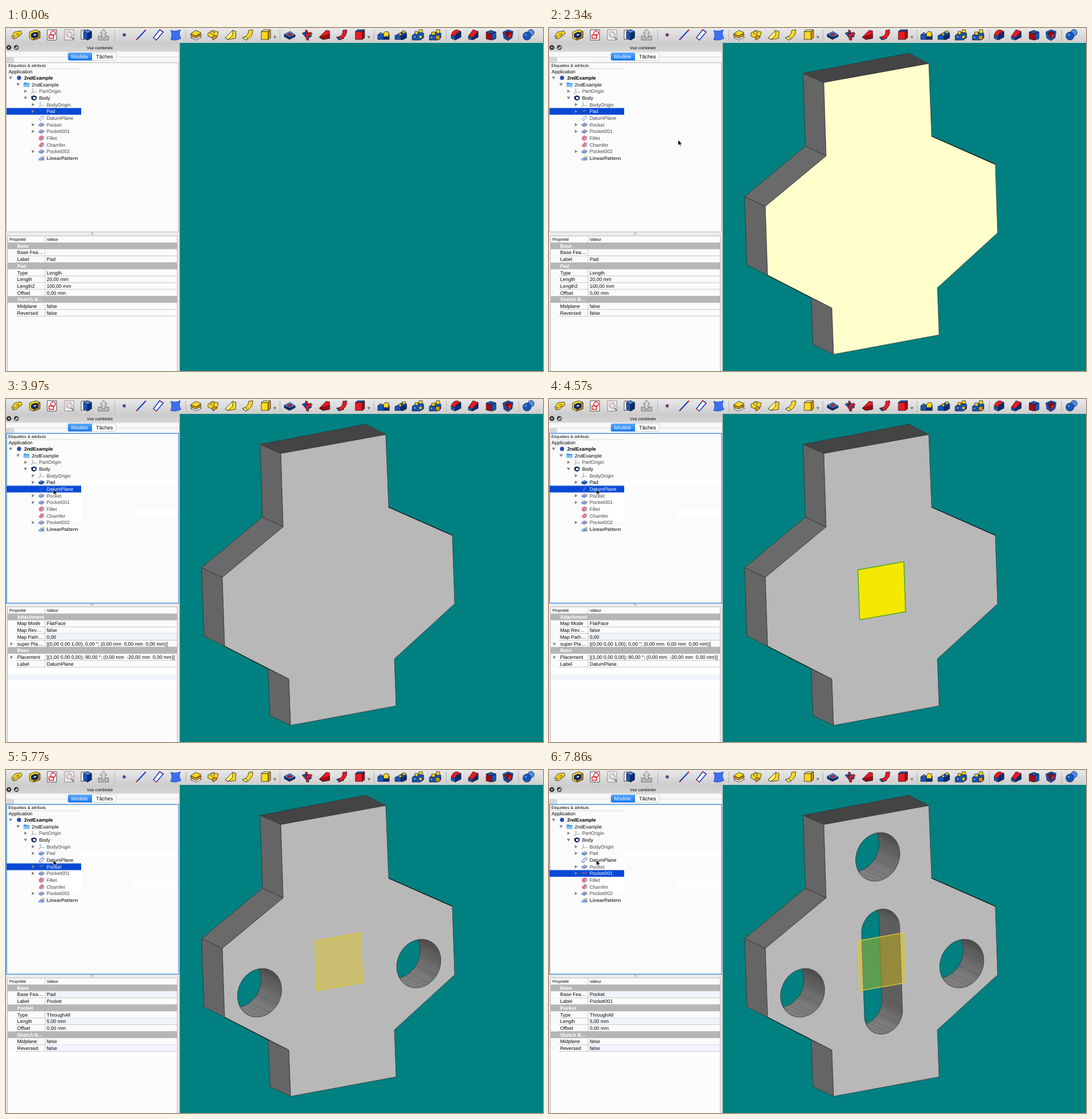
Recreate the animation shown at these times as an HTML page. Size 936 by 598 pixels, loop 8 s.

```html
<!DOCTYPE html>
<html lang="fr">
<head>
<meta charset="utf-8">
<title>Vue combinée</title>
<style>
html, body { margin: 0; width: 100%; height: 100%; overflow: hidden; background: #008080; }
svg { display: block; width: 936px; height: 598px; }
text { font: 8.5px "Liberation Sans", Arial, sans-serif; text-rendering: geometricPrecision; }
.small { font-size: 7.1px; }
.tab { font-size: 9px; }
.bold { font-weight: bold; }
#tools path, #tools circle, #tools rect { stroke: #1c1c28; stroke-width: .8; stroke-linejoin: round; }
#tools .n { fill: none; }
.y { fill: #ffd91c; } .o { fill: #d89a00; } .l { fill: #fff27a; }
.b { fill: #1257c0; } .d { fill: #082a78; } .c { fill: #4b8ff0; }
.r { fill: #ee1820; } .m { fill: #a80810; } .w { fill: #fff; }
#solid polygon, #solid path { stroke: #333; stroke-width: .8; stroke-linejoin: round; }
.row { --ink: #444; --o: .6; }
.row text { fill: var(--ink); }
.row use { opacity: var(--o); }
.live { --ink: #000; --o: 1; }
#bar, #cursor, #face, #plane, .row, .from { animation: 8s step-end infinite; }
#bar { animation-name: bar; }
#cursor { animation-name: cursor; }
#face { animation-name: face; }
#plane { animation-name: plane; }
#pad { animation-name: pad; }
#datum { animation-name: datum; }
#pocket { animation-name: pocket; }
#pocket1 { animation-name: pocket1; }
@keyframes solid { 0% { visibility: hidden } 16.875% { visibility: visible } }
@keyframes hover { 0% { visibility: hidden } 31.125% { visibility: visible } }
@keyframes trail { 0% { visibility: hidden } 36.75% { visibility: visible } }
@keyframes pickDatum { 0% { visibility: hidden } 49.625% { visibility: visible } }
@keyframes pickPocket { 0% { visibility: hidden } 64.625% { visibility: visible } }
@keyframes holes { 0% { visibility: hidden } 72.125% { visibility: visible } }
@keyframes pickPocket1 { 0% { visibility: hidden } 87% { visibility: visible } }
@keyframes slot { 0% { visibility: hidden } 96.375% { visibility: visible } }
@keyframes face { 0% { fill: #ffffcc } 31.125% { fill: #b8b8b8 } }
@keyframes plane {
  0% { visibility: hidden; fill: #f5e800; stroke: #48aa10 }
  53.375% { visibility: visible; fill: #f5e800; stroke: #48aa10 }
  64.625% { visibility: visible; fill: rgba(225,195,10,.42); stroke: #dcc838 }
}
@keyframes bar {
  0% { transform: translateY(0) }
  49.625% { transform: translateY(11.66px) }
  64.625% { transform: translateY(23.32px) }
  87% { transform: translateY(34.98px) }
}
@keyframes pad {
  0% { --ink: #fff; --o: .3 }
  19.875% { --ink: #fff; --o: .8 }
  49.625% { --ink: #000; --o: 1 }
  72.125% { --ink: #444; --o: .6 }
}
@keyframes datum {
  0% { --ink: #444; --o: .6 }
  49.625% { --ink: #fff; --o: .1 }
  57.125% { --ink: #fff; --o: .2 }
  64.625% { --ink: #000; --o: 1 }
}
@keyframes pocket {
  0% { --ink: #444; --o: .6 }
  64.625% { --ink: #fff; --o: .35 }
  72.125% { --ink: #fff; --o: .7 }
  87% { --ink: #000; --o: 1 }
  96.375% { --ink: #444; --o: .6 }
}
@keyframes pocket1 {
  0% { --ink: #444; --o: .6 }
  87% { --ink: #fff; --o: .35 }
  96.375% { --ink: #fff; --o: .7 }
}
@keyframes cursor {
  0% { transform: translate(-30px, -30px) }
  29.25% { transform: translate(225px, 195px) }
  31.125% { transform: translate(124.5px, 202.5px) }
  33% { transform: translate(121px, 200px) }
  34.875% { transform: translate(124.5px, 194px) }
  36.75% { transform: translate(82px, 165px) }
  38.5% { transform: translate(81px, 164px) }
  40.375% { transform: translate(82.5px, 160px) }
  42.125% { transform: translate(83px, 159px) }
  45.875% { transform: translate(83px, 158px) }
  47.75% { transform: translate(82.5px, 157px) }
}
</style>
</head>
<body>
<svg viewBox="0 0 936 598">
<defs>
  <linearGradient id="chrome" x2="0" y2="1"><stop stop-color="#e9e9e9"/><stop offset="1" stop-color="#cdcdcd"/></linearGradient>
  <linearGradient id="title" x2="0" y2="1"><stop stop-color="#cbcbcb"/><stop offset="1" stop-color="#d6d6d6"/></linearGradient>
  <linearGradient id="blue" x2="0" y2="1"><stop stop-color="#57a8fa"/><stop offset="1" stop-color="#1274f4"/></linearGradient>
  <g id="i-app"><circle r="3.6" fill="#2a4cb0"/></g>
  <g id="i-folder"><path d="M-5-3.5h4l1 1h5v6.500h-10z" fill="#3f9be0"/><path d="M-5-.8h10v4.300h-10z" fill="#7cc4f4"/></g>
  <g id="i-axes" fill="none" stroke-width="1.1"><path d="M-2-4.500v6" stroke="#3b62d8"/><path d="M-2 1.500h7" stroke="#4f9a3c"/><path d="M-2 1.500l-3 3" stroke="#d84040"/></g>
  <g id="i-body"><path d="M-5-2.500L0-4.500 5-2.500 4 2.500 0 4.800-4 2.500z" fill="#10245c"/><path d="M-2-1.200L1-2 3-.5 2 2-1 2.300z" fill="#fff"/></g>
  <g id="i-pad"><path d="M-5-.5L0-3.500 5-1.500V1L0 4-5 2z" fill="#123f98"/><path d="M-5-.5L0-3.500 5-1.500 0 1.500z" fill="#3f74cc"/></g>
  <g id="i-plane"><path d="M-4.500 2.500L1.500-4 4.500-2-1.500 4.500z" fill="#fff" stroke="#1c36c0" stroke-width="1"/></g>
  <g id="i-pocket"><path d="M-5-.5L0-3.500 5-1.500V1L0 4-5 2z" fill="#1c4ca8"/><path d="M-5-.5L0-3.500 5-1.500 0 1.500z" fill="#4a80d8"/><path d="M-2-.8L0-2.200 2.500-1.200 0 .5z" fill="#d81c24"/></g>
  <g id="i-fillet"><path d="M-4.500-1Q-3-4.500 1-4.500L4.500-3V2L0 4.500-4.500 3z" fill="#d8202c"/><path d="M1-2L4.500-3V2L0 4.500z" fill="#5872c0"/></g>
  <g id="i-chamfer"><path d="M-4.500 1L0-4.500 4.500-3V2L0 4.500-4.500 3z" fill="#d8202c"/><path d="M1-.5L4.500-3V2L0 4.500z" fill="#5872c0"/></g>
  <g id="i-pattern"><path d="M-5 0h3v-2h3v-2h4v8h-10z" fill="#2a5cb4"/><path d="M1-4h4v3h-4z" fill="#c8b440"/><path d="M-4 1h3v2h-3z" fill="#6c9ae0"/></g>
</defs>

<rect width="936" height="26" fill="url(#chrome)"/>
<g stroke="#b4b4b4"><path d="M189.500 3v20M313.500 3v20M477.500 3v20M641.500 3v20M767.500 3v20M893.500 3v20"/></g>
<path d="M466 14h5l-2.500 5zM630 14h5l-2.500 5z" fill="#777"/>
<g id="tools">
  <g transform="translate(19 12)"><path class="y" d="M-9 2L-4-5 7-7 9-2-1 6-7 7z"/><path class="n" d="M-2-1L4-3M-1 3L5-1"/><circle class="w" cx="-5" cy="3" r="1.500"/></g>
  <g transform="translate(50 12)"><path class="y" d="M-9-5L2-9 9-6V5L-2 9-9 6z"/><path class="o" d="M-2-2L9-6V5L-2 9z"/><path class="d" d="M-6-2L1-5 6-3V3L0 6-6 4z"/><path class="w" d="M-3 0L1-2 4-1 0 2z"/></g>
  <g transform="translate(80 12)"><path class="w" d="M-8-9H8V9H-8z"/><g style="fill:none"><circle cx="2" cy="-3" r="4" style="stroke:#e01820;stroke-width:1.500"/><path d="M-5 0V6H3V0z" style="stroke:#e01820;stroke-width:1.500"/></g></g>
  <g transform="translate(110 12)" opacity=".55"><path class="w" d="M-8-9H8V9H-8z"/><g style="fill:none"><path d="M-5-6H3V2H-5z" style="stroke:#e05058"/><circle cx="1" cy="0" r="4.500"/><path d="M4 4L8 8" style="stroke-width:2"/></g></g>
  <g transform="translate(140 12)"><path class="w" d="M-9-8L-2-9V7L-9 8z"/><path class="b" d="M-5-6L2-9 9-6V5L2 9-5 6z"/><path class="d" d="M2-3L9-6V5L2 9z"/><path class="c" d="M-5-6L2-9 9-6 2-3z"/></g>
  <g transform="translate(170 12)" fill="#b0b0b0" opacity=".65"><path d="M-9 2H9V9H-9z"/><path d="M-3 5V-3H-6L0-10 6-3H3V5z" fill="#d0d0d0"/></g>
  <circle class="b" cx="206" cy="12" r="2.500" style="stroke:#d82020"/>
  <path class="n" d="M228 20L243 4" style="stroke:#1638d0;stroke-width:2"/><path class="n" d="M227 21l2-2M242 5l2-2" style="stroke:#e02020;stroke-width:2"/>
  <path class="w" d="M257 17L268 3 274 7 262 21z" style="stroke:#1638d0;stroke-width:1.600"/><path class="n" d="M256 17h2M267 3h2M273 7h2M261 21h2" style="stroke:#e02020;stroke-width:2"/>
  <path class="c" d="M287 4Q295 7 304 3 300 11 305 18 296 23 287 20 291 12 287 4z" style="stroke:#1638d0;fill:#3d70ee"/>
  <g transform="translate(331 12)"><path class="w" d="M-9 5L1 0 10 4 0 9z"/><path class="o" d="M-9-2L0 2 9-2V1L0 6-9 2z"/><path class="y" d="M-9-2L0-8 9-4 0 2z"/></g>
  <g transform="translate(361 12)"><path class="o" d="M-9 0L-2 4 0 9 7 4 3-1z"/><path class="y" d="M-9-3L-1-8 9-5 7 3 1 0-2 5-9 2z"/><path class="l" d="M-5-3L-1-6 3-4-2-1z"/></g>
  <g transform="translate(391 12)"><path class="y" d="M-9 5L4-8 10-6 9 6-4 8z"/><path class="l" d="M-9 5L4-8 4 1-4 8z"/></g>
  <g transform="translate(421 12)"><path class="y" d="M2-8L9-9Q10 3-3 9L-9 5Q2 2 2-8z"/><path class="l" d="M-9 5L-4 3 1 7-3 9z"/></g>
  <g transform="translate(453 12)"><path class="y" d="M-8-6H4V8H-8z"/><path class="l" d="M-8-6L-4-9H8L4-6z"/><path class="o" d="M4-6L8-9V5L4 8z"/></g>
  <g transform="translate(494 12)"><path class="d" d="M-9-1L0 4 10 0V3L0 8-9 3z"/><path class="c" d="M-9-1L1-6 10 0 0 4z"/><path class="r" d="M-4-1L1-3 5-1 0 2z"/></g>
  <g transform="translate(525 12)"><path class="b" d="M-9-3L0-6 8 2 0 7z"/><path class="r" d="M-3-9L1-7-2-1 6-5 9-2 1 3 3 9-1 9-3 2z"/></g>
  <g transform="translate(555 12)"><path class="r" d="M-9 4L3-8 9-7V6L-3 8z"/><path class="m" d="M-9 4L9-1V6L-3 8z"/></g>
  <g transform="translate(585 12)"><path class="b" d="M-9 4L0 2 4 6-5 9z"/><path class="r" d="M2-8L9-9Q10 3-2 8L-6 4Q3 1 2-8z"/></g>
  <g transform="translate(617 12)"><path class="r" d="M-8-6H4V8H-8z"/><path class="b" d="M-8-6L-4-9H8L4-6z"/><path class="m" d="M4-6L8-9V5L4 8z"/></g>
  <g transform="translate(658 12)"><path class="b" d="M-10 0L-5-4 0-1V8H-10z"/><path class="d" d="M0-1H10V8H0z"/><path class="y" d="M0-3L3-6 9-5V3H0z"/><path class="c" d="M-10 0L-5-4 0-1z"/></g>
  <g transform="translate(688 12)"><path class="b" d="M-10 1L-3-2 3-6 10-4V5L4 8H-10z"/><path class="d" d="M0 2L10-2V5L4 8H0z"/><path class="y" d="M3-7h5v4h-5zM-3-3h4v4h-4z"/></g>
  <g transform="translate(718 12)"><path class="b" d="M-10 1L-2-5 10-3V5L4 9H-10z"/><path class="y" d="M2-9h6v5h-6zM-5-6h5v5h-5z"/><path class="c" d="M-8 1h5v5h-5z"/><path class="y" d="M2 1h5v5h-5z"/></g>
  <g transform="translate(748 12)"><path class="b" d="M-10 1L-2-5 10-3V5L4 9H-10z"/><path class="y" d="M2-9h6v6h-6zM-6-5h6v5h-6z"/><path class="o" d="M1 1h7v7h-7z"/><path class="c" d="M-9 2h5v5h-5z"/></g>
  <g transform="translate(784 12)"><path class="d" d="M-1-1L9-6V4L-1 9z"/><path class="r" d="M-8 0Q-6-8 2-9L9-6Q0-5-1 3z"/><path class="b" d="M-8 0L-1 3V9L-8 6z"/></g>
  <g transform="translate(814 12)"><path class="d" d="M-1 3L9-6V4L-1 9z"/><path class="r" d="M-8 2L0-9 9-6-1 5z"/><path class="b" d="M-8 2L-1 5V9L-8 7z"/></g>
  <g transform="translate(845 12)"><path class="m" d="M-8-5H8V7L0 9-8 7z"/><path class="b" d="M-8-5L0-8 9-5 0-2z"/><path class="b" d="M2-2L9-5V6L2 9z"/></g>
  <g transform="translate(875 12)"><path class="b" d="M-9-5L0-9 9-6 7 5 0 10-7 6z"/><path class="m" d="M-6-3L0-6 6-4 0 6z"/><path class="r" d="M0 0L6-4 5 4 0 7z"/><path class="n" d="M0-6V0L-5 5"/></g>
  <circle class="c" cx="915" cy="8" r="5.500"/><circle class="b" cx="908" cy="14" r="7"/><circle class="c" cx="906" cy="12" r="2" style="stroke:none"/>
</g>

<rect y="26" width="303" height="572" fill="#ededed"/>
<rect y="26" width="303" height="15.500" fill="url(#title)"/>
<g fill="#333"><circle cx="5" cy="34" r="4.300"/><circle cx="18" cy="34" r="4.300"/></g>
<path d="M3.400 32.400l3.200 3.200m0-3.200l-3.200 3.200M16 34.500h2.500v-2h1.800v2.800h-2.500v1H16z" stroke="#fff" fill="none" stroke-width=".9"/>
<text class="small" x="141" y="36.500">Vue combinée</text>
<rect y="41.500" width="301" height="18" fill="#f8f8f8"/>
<rect y="50" width="14" height="10" fill="#d8d8d8"/>
<path d="M0 50.500H301" stroke="#dadada"/>
<rect x="108" y="43" width="84" height="13.500" rx="2.500" fill="#fff" stroke="#c4c4c4" stroke-width=".8"/>
<path d="M150 43h-39.500q-2.500 0-2.500 2.500v8.500q0 2.500 2.500 2.500h39.500z" fill="url(#blue)"/>
<text class="tab" x="113.500" y="53" fill="#fff">Modèle</text>
<text class="tab" x="157" y="53">Tâches</text>

<rect x=".5" y="60.500" width="300" height="295" fill="#fbfbfc" stroke="#b8b8b8"/>
<g fill="#fff">
  <rect class="from" style="animation-name:hover" x="224" y="194" width="74" height="12"/>
  <rect class="from" style="animation-name:trail" x="81" y="164" width="51" height="50"/>
  <rect class="from" style="animation-name:pickDatum" x="131" y="140" width="169" height="11"/>
</g>
<rect class="from" style="animation-name:pickDatum" x="1" y="60" width="300" height="296" fill="none" stroke="#72aaea" stroke-width="2"/>
<text class="small" x="4" y="68.300">Étiquettes &amp; attributs</text>
<path d="M1 71H131" stroke="#d0d0d0" stroke-width=".8"/>
<text x="4.500" y="78.600">Application</text>
<rect id="bar" x="1" y="139.500" width="130" height="11.700" fill="#0848d6"/>
<g id="tree"></g>
<circle cx="150.500" cy="358.500" r="1.800" fill="#ccc" stroke="#aaa" stroke-width=".6"/>
<rect x="2.500" y="362.500" width="296" height="240" fill="#fbfbfc" stroke="#b8b8b8"/>
<text class="small" x="6" y="371">Propriété</text><text class="small" x="71" y="371">Valeur</text>
<path d="M68 363V374" stroke="#ccc"/>
<g id="props"></g>
<rect x="301.500" y="26" width="1.500" height="572" fill="#c4c4c4"/>

<rect x="303" y="26" width="633" height="572" fill="#008080"/>
<g id="solid" class="from" style="animation-name:solid">
  <path d="M443 79L627 44 662 62 479 95z" fill="#444"/>
  <path d="M443 79L479 95 483 223 447 206z" fill="#656565"/>
  <path d="M447 206L483 223 377 311 341 294z" fill="#6a6a6a"/>
  <path d="M341 294L377 311 381 431 345 413z" fill="#656565"/>
  <path d="M457 471L493 488 496 569 460 552z" fill="#656565"/>
  <path id="face" d="M479 95L662 62 667 189 778 238 782 357 677 453 680 535 496 569 493 488 381 431 377 311 483 223z"/>
  <path d="M667 188.500L778 237.500M381 431L457 470.500" fill="none" style="stroke:#1c1c1c;stroke-width:1.300"/>
  <g id="cuts"></g>
</g>
<path id="plane" d="M538.500 298L618.500 283.500 621.500 371 541.500 385z" stroke-width="1.400"/>
<path id="cursor" d="M0 0V9.500L2.200 7.600 3.800 11 5.400 10.300 3.900 7H6.800z" stroke="#fff" stroke-width=".7"/>
</svg>
<script>
const $ = id => document.getElementById(id);

const arrow = (x, y, open) =>
  `<path fill="#868686" d="M${x} ${y}${open ? 'm-3-2.300h6l-3 5z' : 'm-2-2.800v5.600l5-2.800z'}"/>`;

// depth, fold (1 open, 0 closed, -1 none), icon, label, id, classes
const tree = [
  [0, 1, 'app', '2ndExample', '', 'live bold'],
  [1, 1, 'folder', '2ndExample', '', 'live'],
  [2, 0, 'axes', 'PartOrigin'],
  [2, 1, 'body', 'Body', '', 'live'],
  [3, 0, 'axes', 'BodyOrigin'],
  [3, 0, 'pad', 'Pad', 'pad'],
  [3, -1, 'plane', 'DatumPlane', 'datum'],
  [3, 0, 'pocket', 'Pocket', 'pocket'],
  [3, 0, 'pocket', 'Pocket001', 'pocket1'],
  [3, -1, 'fillet', 'Fillet'],
  [3, -1, 'chamfer', 'Chamfer'],
  [3, 0, 'pocket', 'Pocket002'],
  [3, -1, 'pattern', 'LinearPattern', '', 'bold'],
];
$('tree').innerHTML = tree.map(([depth, fold, icon, label, id = '', cls = ''], i) => {
  const x = 8 + 13 * depth, y = 75.3 + 11.66 * (i + 1);
  return `<g class="row ${cls}" ${id && `id="${id}"`}>${fold < 0 ? '' : arrow(x, y, fold)}
    <use href="#i-${icon}" x="${x + 14.7}" y="${y}"/>
    <text class="${cls}" x="${x + 23.7}" y="${y + 3}">${label}</text></g>`;
}).join('');

// A plain string is a group heading; flags: t = tinted, a = expandable
function sheet(start, rows, residue = '') {
  const body = rows.map((row, i) => {
    const y = 374 + 11.68 * i, base = y + 8.8;
    if (typeof row === 'string')
      return `<rect x="3" y="${y}" width="295" height="11.700" fill="#b6b6b6"/>
        <text class="bold" x="19.500" y="${base}" fill="#fff">${row}</text>`;
    const [name, value, flags = ''] = row;
    return (flags.includes('t') ? `<rect x="68" y="${y}" width="230" height="11.700" fill="#f0f5fc"/>` : '') +
      `<path d="M17 ${y + 11.6}H298M68 ${y}v11.700" stroke="#bcbcbc" stroke-width=".8"/>` +
      (flags.includes('a') ? arrow(9.5, y + 6) : '') +
      `<text x="19.500" y="${base}">${name}</text><text x="71" y="${base}">${value.replace(/  /g, '\u00a0\u00a0')}</text>`;
  }).join('');
  return `<g class="from" style="animation-name:${start}">
    <rect x="3" y="374" width="295" height="224" fill="#fbfbfc"/>${residue}${body}</g>`;
}
const flags = [['Midplane', 'false'], ['Reversed', 'false', 't']];
const pocketSheet = (start, base, label) => sheet(start, [
  'Base', ['Base Fea…', base, 't'], ['Label', label],
  'Pocket', ['Type', 'ThroughAll'], ['Length', '5,00 mm', 't'], ['Offset', '0,00 mm'],
  'Sketch B…', ...flags,
], '<rect x="3" y="491" width="295" height="9" fill="#fff"/>');
$('props').innerHTML =
  sheet('none', [
    'Base', ['Base Fea…', ''], ['Label', 'Pad'],
    'Pad', ['Type', 'Length'], ['Length', '20,00 mm'], ['Length2', '100,00 mm'], ['Offset', '0,00 mm'],
    'Sketch B…', ['Midplane', 'false'], ['Reversed', 'false'],
  ]) +
  sheet('pickDatum', [
    'Attachment', ['Map Mode', 'FlatFace'], ['Map Rev…', 'false'], ['Map Path…', '0,00', 't'],
    ['super Pla…', '[(0,00 0,00 1,00); 0,00 °; (0,00 mm  0,00 mm  0,00 mm)]', 'a'],
    'Base', ['Placement', '[(1,00 0,00 0,00); 90,00 °; (0,00 mm  -20,00 mm  0,00 mm)]', 'a'],
    ['Label', 'DatumPlane'],
  ], '<rect x="3" y="468" width="295" height="35" fill="#fff"/><rect x="3" y="480" width="295" height="10" fill="#f0f5fc"/>') +
  pocketSheet('pickPocket', 'Pad', 'Pocket') +
  pocketSheet('pickPocket1', 'Pocket', 'Pocket001');

// Round or oblong through-cut on the front face: faceted wall, then the opening at the back
let cuts = 0;
function cut(start, cx, cy, r, half = 0) {
  const n = 40, dx = -36, dy = -17, id = 'cut' + cuts++;
  const at = k => {
    const a = (k + .5) / n * 2 * Math.PI, u = r * Math.cos(a), s = Math.sin(a);
    const v = r * s + Math.sign(s) * half;
    return [cx + 81 * u + 3 * v, cy - 15 * u + 88 * v];
  };
  const ring = Array.from({ length: n }, (_, k) => at(k));
  const back = ([x, y]) => [x + dx, y + dy];
  const wall = ring.map((p, k) => {
    const q = ring[(k + 1) % n], a = (k + 1) / n * 2 * Math.PI;
    const g = Math.round(94 + 32 * Math.sin(a) + (k % 3 - 1) * 4 * Math.abs(Math.sin(a)));
    const ink = `rgb(${g},${g},${g})`;
    return `<polygon points="${[p, q, back(q), back(p)].join(' ')}" fill="${ink}" style="stroke:${k % 4 ? ink : '#4a4a4a'};stroke-width:.5"/>`;
  }).join('');
  return `<g class="from" style="animation-name:${start}">
    <clipPath id="${id}"><polygon points="${ring.join(' ')}"/></clipPath>
    <g clip-path="url(#${id})">${wall}<polygon points="${ring.map(back).join(' ')}" fill="#008080"/></g>
    <polygon points="${ring.join(' ')}" fill="none"/></g>`;
}
$('cuts').innerHTML =
  cut('holes', 442, 388.5, .475) + cut('holes', 719.5, 337.5, .475) +
  cut('slot', 573, 151.5, .475) + cut('slot', 580.5, 351.5, .41, .824);
</script>
</body>
</html>
```
